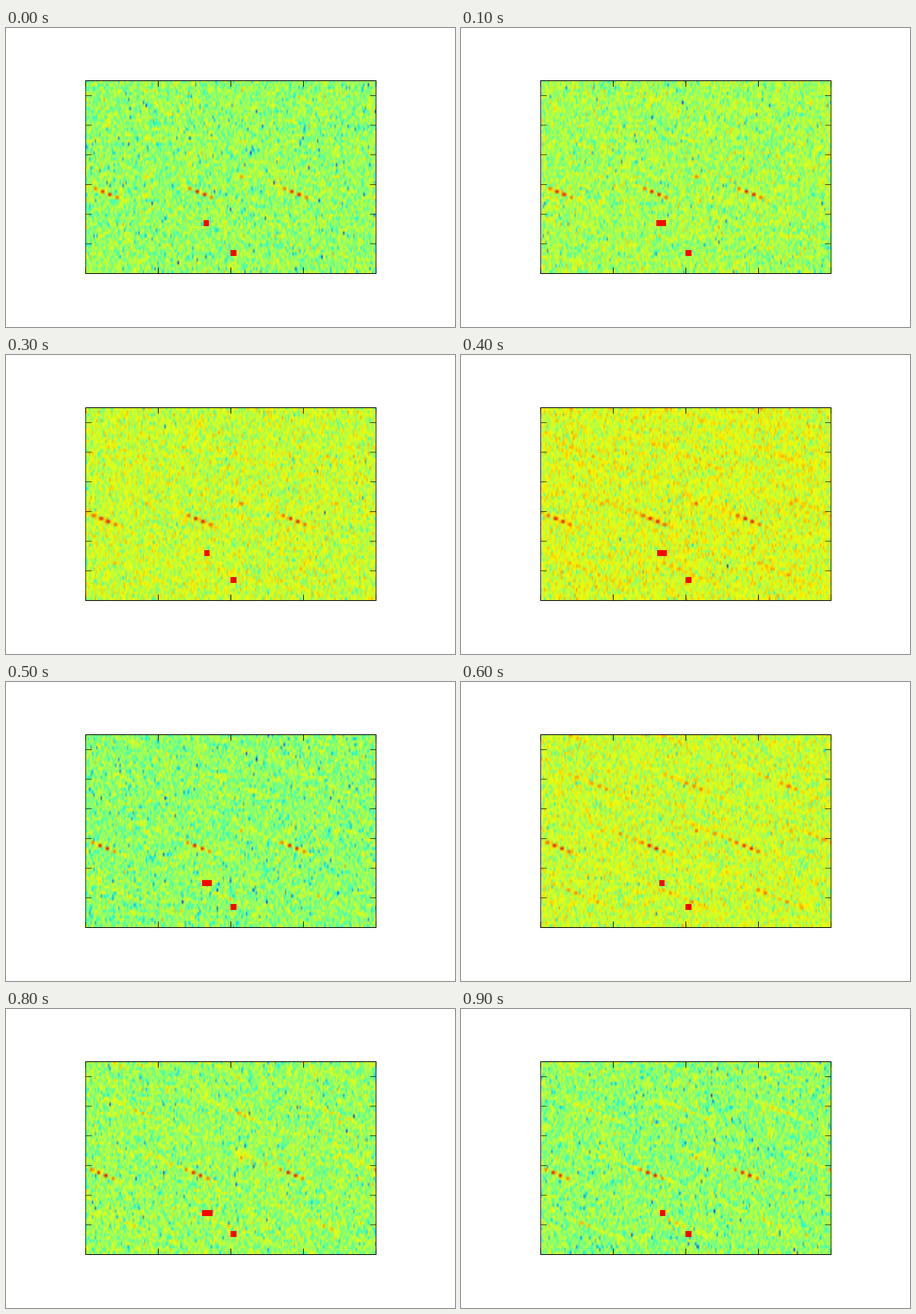
These frames come from a looping animation (600x400 px, 1000 ms). A matplotlib script:

```python
import numpy as np
import matplotlib.pyplot as plt
from matplotlib.animation import FuncAnimation
from matplotlib.patches import Rectangle

W, H, DPI = 600, 400, 100
FRAMES, INTERVAL = 10, 100
LEFT, RIGHT, TOP, BOTTOM = 106.5, 494.5, 70.5, 328.5
ROWS, COLS = 65, 200
CELL_W, CELL_H = (RIGHT - LEFT) / COLS, (BOTTOM - TOP) / ROWS

PERIOD = 126.6      # horizontal distance between echoes, px
STEP = 9.69         # shift of a chirp from one row to the next, px
DRIFT = 0.65        # leftward drift per frame, px
MAIN_ROW, BAND_ROW, BAND_SPACING = 37.5, 16, 19
TONE_ROW, TONE_X = 32, 314

row, col = np.mgrid[:ROWS, :COLS]
x = LEFT + (col + 0.5) * CELL_W


def bell(distance, width):
    return np.exp(-0.5 * (distance / width) ** 2)


def wrap(distance):
    """Signed distance to the nearest multiple of the period."""
    return (distance + PERIOD / 2) % PERIOD - PERIOD / 2


def blend_dots(image, offset, level, strength):
    weight = bell(offset, 1.2 * CELL_W) * np.clip(strength / 0.09, 0, 1)
    return image + (level + strength - image) * weight


def spectrogram(n):
    rng = np.random.default_rng(40 + n)

    # Log-power noise; its level climbs, resets, and jumps once more.
    level = np.interp(n, [0, 4, 5, 6, 7, 9], [0.53, 0.61, 0.52, 0.59, 0.545, 0.525])
    spread = 0.18 * (0.95 - level)
    power = np.log(rng.gamma(3, size=(ROWS, COLS)))
    image = level + spread * (power - 0.923) / 0.628

    # Diagonal echoes: one bright group, with side bands that fade in.
    shift = x - (128.5 - DRIFT * n) - STEP * (row - 37)
    echo = np.floor(shift / PERIOD + 0.5).astype(int) % 20
    bands = 0.65 + 0.35 * np.cos(2 * np.pi * (row - BAND_ROW) / BAND_SPACING)
    side = np.interp(n, [0, 6, 9], [0.03, 0.22, 0.19]) * bands
    side = side * rng.uniform(0.4, 1.1, (ROWS, 1))
    side = side * rng.uniform(0.75, 1.1, (ROWS, 20))[row, echo]
    main = (0.93 - level) * bell(row - MAIN_ROW, 1.7)
    image = blend_dots(image, wrap(shift), level, np.maximum(main, side))

    # Stationary tone in one row, strongest in the middle.
    tone = np.where(np.abs(x - TONE_X) < PERIOD / 2, 0.23, 0.15)
    return blend_dots(image, wrap(x - TONE_X), level, tone * (row == TONE_ROW))


fig = plt.figure(figsize=(W / DPI, H / DPI), dpi=DPI, facecolor="white")
ax = fig.add_axes([0, 0, 1, 1])
ax.set_axis_off()

picture = ax.imshow(spectrogram(0), cmap="jet", vmin=0, vmax=1,
                    interpolation="bilinear", interpolation_stage="rgba",
                    aspect="auto", extent=(LEFT, RIGHT, BOTTOM, TOP))
ax.set_xlim(0, W)
ax.set_ylim(H, 0)


def line(xs, ys, width):
    ax.plot(xs, ys, color="black", lw=width * 72 / DPI, snap=False,
            solid_capstyle="butt", zorder=4)


def marker(width=7):
    return ax.add_patch(Rectangle((0, 0), width, 8, fc="red", ec="none", zorder=3))


def place(patch, cx, cy):
    patch.set_xy((cx - patch.get_width() / 2, cy - 4))


for edge in (TOP, BOTTOM):
    line((LEFT - 0.5, RIGHT + 0.5), (edge, edge), 1)
for edge in (LEFT, RIGHT):
    line((edge, edge), (TOP, BOTTOM), 0.8)
for tick in np.linspace(LEFT, RIGHT, 5):
    line((tick, tick), (TOP, TOP + 8), 0.9)
    line((tick, tick), (BOTTOM - 8, BOTTOM), 0.9)
for tick in np.arange(BOTTOM, TOP, -10 * CELL_H):
    line((LEFT, LEFT + 8), (tick, tick), 0.7)
    line((RIGHT - 8, RIGHT), (tick, tick), 0.7)

place(marker(8), 304, 301)
movers = [marker(), marker()]


def update(n):
    picture.set_data(spectrogram(n))
    # The pair sinks one row per three frames and merges on every third.
    cx, cy = 267.5 + 0.2 * n, 261 + 4 * round(n / 3)
    gap = 3.25 if n % 3 else 0
    place(movers[0], cx - gap, cy)
    place(movers[1], cx + gap, cy)
    return [picture, *movers]


anim = FuncAnimation(fig, update, frames=FRAMES, interval=INTERVAL,
                     repeat=True, repeat_delay=0, blit=False)
plt.show()
```
